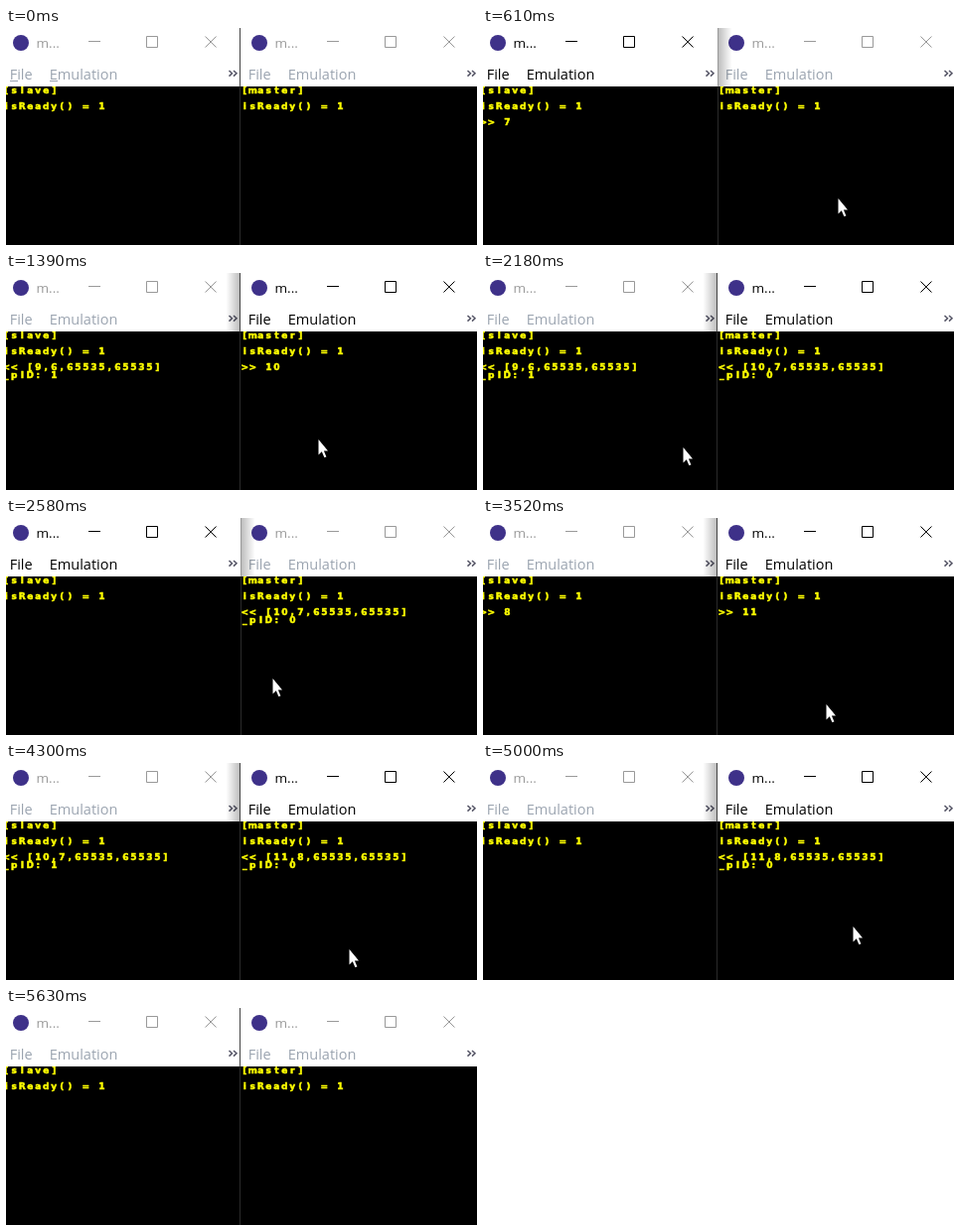
Animation of 474 by 219 pixels, one loop 5.71 s. Source, as an HTML page with a canvas:

```html
<!DOCTYPE html>
<html lang="en">
<head>
<meta charset="utf-8">
<title>Two linked emulator windows</title>
<style>
  html, body { margin: 0; width: 100%; height: 100%; overflow: hidden; background: #000; }
  canvas { display: block; }
</style>
</head>
<body>
<canvas id="stage" width="474" height="219"></canvas>
<script>
const ctx = document.getElementById('stage').getContext('2d');
const LOOP = 5710, ROUND = 2590, FIRST_ROUND = 380;
const STEP = 78, STEPS_PER_MOVE = 8;
const WIDTH = 240, CELL = 8, MENU_BOTTOM = 59;

// Times are relative to the start of a round; both rounds run alike.
const slave = { name: 'slave', id: 1, sends: 7, reads: [9, 6], sendAt: 0, readAt: 1010, clearAt: 1870 };
const master = { name: 'master', id: 0, sends: 10, reads: [10, 7], sendAt: 470, readAt: 1330, clearAt: 2350 };

// Pointer moves: start time and destination.
const moves = [
  [-90, 363, 172], [610, 314, 167], [1630, 201, 175],
  [2260, 308, 152], [2970, 345, 187], [4840, 417, 125]
];

const phasesAt = t => [0, 1].map(round => t - FIRST_ROUND - round * ROUND);

function focusAt(t) {
  if (t < 70 || t >= 5630) return 'none';
  return phasesAt(t).some(phase => phase >= -630 && phase < 310) ? 'left' : 'right';
}

function logAt(t, unit) {
  return phasesAt(t).flatMap((phase, round) => {
    if (phase < unit.sendAt || phase >= unit.clearAt) return [];
    if (phase < unit.readAt) return [`>> ${unit.sends + round}`];
    const values = unit.reads.map(value => value + round);
    return [`<< [${values},65535,65535]`, `_pID: ${unit.id}`];
  });
}

function line(color, width, ...paths) {
  ctx.strokeStyle = color;
  ctx.lineWidth = width;
  ctx.stroke(new Path2D(paths.join('')));
}

function label(text, x, y, size, color) {
  ctx.font = `${size}px "Open Sans", sans-serif`;
  ctx.textAlign = 'left';
  ctx.fillStyle = color;
  ctx.fillText(text, x, y);
}

function consoleLine(text, row) {
  [...text].forEach((char, i) => {
    const x = i * CELL + 0.3, y = 66 + row * CELL;
    ctx.fillText(char, x, y);
    ctx.strokeText(char, x, y);
  });
}

function drawConsole(unit, t) {
  ctx.fillStyle = '#000';
  ctx.fillRect(-4, MENU_BOTTOM, WIDTH, 160);
  ctx.beginPath();
  ctx.rect(-4, MENU_BOTTOM, WIDTH, 160);
  ctx.clip();
  ctx.fillStyle = ctx.strokeStyle = '#ff0';
  ctx.lineWidth = 0.5;
  ctx.textAlign = 'center';
  ctx.font = 'bold 9px "DejaVu Sans", sans-serif';
  consoleLine(`[${unit.name}]`, 0);
  consoleLine('isReady() = 1', 2);
  logAt(t, unit).forEach((text, i) => consoleLine(text, 4 + i));
}

function drawWindow(x, unit, t, active) {
  ctx.save();
  ctx.translate(x, 0);
  ctx.beginPath();
  ctx.rect(-4, 0, WIDTH, 219);
  ctx.clip();
  ctx.fillStyle = '#fff';
  ctx.fillRect(-4, 0, WIDTH, MENU_BOTTOM);

  ctx.fillStyle = '#3e3189';
  ctx.beginPath();
  ctx.arc(15, 15, 8, 0, 7);
  ctx.fill();

  const menuInk = active ? '#000' : '#9ba4b0';
  label('m...', 30.5, 20, 13.5, active ? '#000' : '#999');
  label('File', 3.7, 52, 14.5, menuInk);
  label('Emulation', 43.7, 52, 14.5, menuInk);
  if (unit === slave && t < 70) line(menuInk, 1, 'M4 53.5h8', 'M44 53.5h8');

  line(active ? '#000' : '#999', 1, 'M83 13.5h12', 'M141.5 8.5h11v11h-11z', 'M200.5 8.5l11 11', 'M211.5 8.5l-11 11');
  line('#556', 1.5, 'M224.5 43l3 2.8-3 2.8', 'M229 43l3 2.8-3 2.8');
  drawConsole(unit, t);
  ctx.restore();
}

// The front window throws a soft shadow on its neighbour.
function drawEdge(front) {
  const left = front === 'left', edge = left ? 236.5 : 235.5;
  if (front !== 'none') {
    const far = edge + (left ? 14 : -14);
    const shade = ctx.createLinearGradient(edge, 0, far, 0);
    shade.addColorStop(0, '#0004');
    shade.addColorStop(1, '#0000');
    ctx.fillStyle = shade;
    ctx.fillRect(edge, 0, far - edge, MENU_BOTTOM);
  }
  line(left ? '#999' : '#444', 1, `M${edge} 0V59`);
  line('#2a2a2a', 1, `M${edge} 59V219`);
}

function drawPointer(t) {
  let x = 190, y = 172;
  for (const [start, endX, endY] of moves) {
    if (t < start) break;
    const part = Math.min(1, (Math.floor((t - start) / STEP) + 1) / STEPS_PER_MOVE);
    x += (endX - x) * part;
    y += (endY - y) * part;
  }
  ctx.save();
  ctx.translate(Math.round(x), Math.round(y));
  const arrow = new Path2D('M.5 1V16.5L3.8 13.2 6.4 19.2 8.4 18.4 5.9 12.4H10Z');
  ctx.fillStyle = '#fff';
  ctx.strokeStyle = '#000';
  ctx.lineWidth = 1;
  ctx.stroke(arrow);
  ctx.fill(arrow);
  ctx.restore();
}

function draw(t) {
  const front = focusAt(t);
  drawWindow(0, slave, t, front === 'left');
  drawWindow(WIDTH, master, t, front === 'right');
  drawEdge(front);
  if (front !== 'none') drawPointer(t);
}

const begin = performance.now();
function tick() {
  draw((performance.now() - begin) % LOOP);
  requestAnimationFrame(tick);
}
tick();
</script>
</body>
</html>
```
